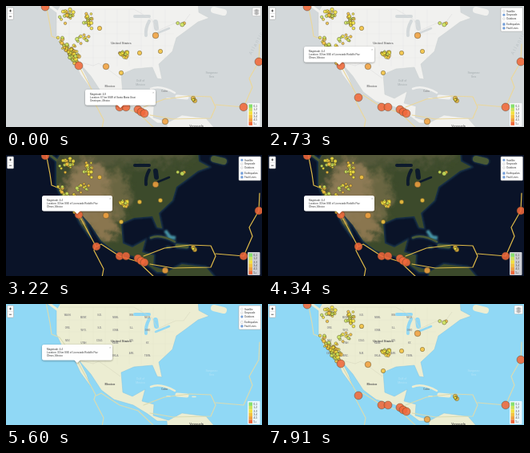
Animation, 320 px wide and 152 px high, one loop 8000 ms. Source, as an HTML page:

```html
<!DOCTYPE html>
<html lang="en">
<head>
<meta charset="utf-8">
<title>Earthquake map</title>
<style>
  html, body { margin: 0; width: 100%; height: 100%; overflow: hidden; }
  svg { display: block; width: 100vw; height: 100vh; }
  text { font-family: "Liberation Sans", Arial, sans-serif; font-size: 3px; fill: #333; }
  .mid { text-anchor: middle; }
  .round { stroke-linecap: round; stroke-linejoin: round; }
</style>
</head>
<body>
<svg id="stage" viewBox="0 0 320 152" preserveAspectRatio="none"></svg>
<script>
const LOOP = 8000;
const COLORS = ['#86e070', '#cbe45c', '#f4e23f', '#f4c23f', '#f0a03f', '#f0683a'];

// Map outlines as a few key points; islands and lakes are thick round strokes
const land = `M70-5 63 8 63 38 69 51 85 69 93 86 106 104 101 89 92 72 106 88 119 108 135 120 159 127 177 138
  189 147 201 147 203 175 275 170 250 141 220 137 203 146 184 140 185 126 170 122 174 107 158 116 146 111
  144 86 160 79 183 77 189 91 195 92 191 73 208 57 213 40 224 32 240 20 254 15 241 8 240-5Z`;
const islands = [
  ['M181 104Q193 99 211 109', 2.5], ['M214 114 226 115', 5], ['M201 116h4M233 116.5h4', 1.5],
  ['M52-2 64 7', 3], ['M260 5 272 8', 8]
];
const lakes = [['M161 13 179 13', 4], ['M175 37Q174 28 179 19', 4], ['M187 20 188 28', 6], ['M187 35 204 28', 2.5]];
const borders = 'M67 4H160L182 17 190 31 212 21H222L230 10M85 69 109 75 116 72 128 80 143 91';
const faults = `M50-2 55 24 57 38 67 42 91 75 112 114 110 120 122 143 120 154M113 115 119 112 142 127 165 134 186 154
  M172 127 198 117 230 113 256 114 262 127 256 141 209 142 180 137M262 124 297 127 308 102 304 91 316 70 317 48`;

let seed = 11;
const rand = () => (seed = seed * 16807 % 2147483647) / 2147483647;
const spread = w => (rand() + rand() - 1) * w;

// Markup helpers
const rect = (x, y, w, h, fill, extra = '') => `<rect x="${x}" y="${y}" width="${w}" height="${h}" fill="${fill}" ${extra}/>`;
const path = (d, fill, stroke = 'none', width = .4, extra = '') =>
  `<path d="${d}" fill="${fill}" stroke="${stroke}" stroke-width="${width}" ${extra}/>`;
const text = (x, y, s, style = '', cls = '') => `<text x="${x}" y="${y}" class="${cls}" style="${style}">${s}</text>`;
const label = (x, y, s, size, fill, weight = 400) =>
  text(x, y, s, `font-size:${size}px;fill:${fill};font-weight:${weight}`, 'mid');
const group = (id, content) => `<g id="${id}">${content}</g>`;
const strokes = (list, color, extra = 0) => list.map(([d, w]) => path(d, 'none', color, w + extra, 'class="round"')).join('');
const blob = ([x, y, rx, ry, fill]) => `<ellipse cx="${x}" cy="${y}" rx="${rx}" ry="${ry}" fill="${fill}"/>`;
const disc = (x, y, r, level) =>
  `<circle cx="${x}" cy="${y}" r="${r}" fill="${COLORS[level]}" fill-opacity=".88" stroke="#443c20" stroke-width=".4"/>`;

// Earthquakes: single strong ones, then seeded swarms
const discs = (points, r, level) => points.map(([x, y]) => disc(x, y, r, level)).join('');
const smallDisc = (x, y) => disc(x, y, 1.2 + rand() * 1.4, 1 + Math.floor(rand() * 3));
const repeat = (n, make) => Array.from({ length: n }, (_, i) => make(i)).join('');
const swarm = (x, y, w, h, n) => repeat(n, () => smallDisc(x + spread(w), y + spread(h)));
const californiaSwarm = repeat(80, () => {
  const k = Math.sqrt(rand());
  return smallDisc(66 + 23 * k + spread(5), 40 + 28 * k + spread(6));
});
const quakes =
  discs([[49, 1], [113, 115], [142, 127], [150, 127], [165, 130], [169, 133], [173, 135], [297, 127], [316, 70]], 5, 5) +
  discs([[187, 37], [199, 145], [125, 76]], 3.8, 4) +
  discs([[144, 84], [193, 57], [117, 28], [167, 59], [234, 116], [236, 119]], 2.7, 3) +
  swarm(102, 18, 8, 13, 18) + swarm(77, 13, 11, 13, 20) + swarm(147, 60, 8, 5, 18) + swarm(95, 46, 12, 12, 14) +
  swarm(219, 22, 5, 2, 3) + swarm(235, 118, 2, 3, 4) + californiaSwarm + disc(91, 75, 5, 5);

const stateGrid = repeat(9, i => `M${79 + i * 15} 4V${i < 2 ? 58 : 76}`) + repeat(4, i => `M62 ${20 + i * 15}H210`);
const stateNames = fill => 'WASH. MONT. N.D. MINN. WIS. MICH. ORE. WYO. S.D. IOWA ILL. OHIO NEV. UTAH COLO. KANS. MO. KY. CALIF. ARIZ. N.M. OKLA. ARK. TENN.'
  .split(' ').map((name, i) => label(77 + i % 6 * 20, 15 + Math.floor(i / 6) * 16 + i % 2 * 3, name, 2.6, fill, 700)).join('');
const countries = fill => label(144, 48, 'United States', 4, fill, 700) + label(130, 102, 'Mexico', 3.8, fill, 700) +
  label(198, 108, 'Cuba', 3.2, fill) + label(238, 151.5, 'Venezuela', 3.6, fill, 700);
const seaNames = fill => label(168, 95, 'Gulf of', 3.6, fill) + label(168, 99.5, 'Mexico', 3.6, fill) +
  label(257, 85, 'Sargasso', 3.6, fill) + label(257, 90, 'Sea', 3.6, fill);

const drawnMap = (sea, ground, coast, line) => rect(0, 0, 320, 152, sea) + path(land, ground, coast, .5) +
  strokes(islands, ground) + strokes(lakes, sea) +
  path(stateGrid, 'none', line, .25, 'clip-path="url(#onLand)"') + path(borders, 'none', line, .6);

const terrain = [
  [140, -2, 95, 14, '#55583b'], [104, 48, 30, 40, '#8d7a55'], [140, 50, 14, 32, '#6b6642'],
  [122, 88, 18, 18, '#8a7650'], [70, 24, 9, 30, '#3d492f']
];
const satellite = rect(0, 0, 320, 152, '#0a1328') +
  `<g filter="url(#shelf)">${path(land, 'none', '#1d3850', 3) + strokes(islands, '#1d3850', 2)}
    ${path('M199 95 205 103 212 104', 'none', '#4796a8', 4)}</g>` +
  path(land, '#3c4a2b') + strokes(islands, '#4a5a35') +
  `<g clip-path="url(#onLand)"><g filter="url(#mottle)">${terrain.map(blob).join('')}</g></g>` + strokes(lakes, '#0d1a2c');

const popup = (id, x, y, lines) => group(id,
  `<g filter="url(#shadow)">` + rect(x, y, 88, 19.5, '#fff', 'rx="2.5"') +
  path(`M${x + 40} ${y + 19}h8l-4 4z`, '#fff') + '</g>' +
  lines.map((s, i) => text(x + 6, y + 7 + i * 4.2, s)).join('') +
  text(x + 84, y + 4.5, '×', 'font-size:4px;fill:#999'));

const option = (id, y, s, corner) => {
  const box = (fill, extra) => rect(293.5, y - 2.6, 2.8, 2.8, fill, `rx="${corner}" ${extra}`);
  return box('#fff', 'stroke="#aaa" stroke-width=".4"') + box('#6f9fe0', `id="${id}"`) + text(298, y, s);
};

const controls =
  rect(1.5, 2, 8, 15, '#fff', 'rx="1" stroke="#aaa" stroke-width=".6"') + path('M1.5 9.5h8', 'none', '#ccc') +
  path('M4 6h3M5.5 4.5v3M4 13.2h3', 'none', '#222', .7) +
  rect(302, 122, 15.5, 29, '#fff', 'rx="1" fill-opacity=".8"') +
  COLORS.map((c, i) => rect(303.5, 123.5 + i * 4.4, 4.5, 4.4, c) +
    text(309.5, 126.8 + i * 4.4, i < 5 ? `${i}-${i + 1}` : '5+')).join('') +
  group('icon', rect(308, 2, 10.5, 10.5, '#fff', 'rx="1.2" stroke="#bbb" stroke-width=".6"') +
    repeat(3, i => path(`M313.2 ${8 - i * 2.1}l4 1.7-4 1.7-4-1.7z`, '#aaa', '#fff', .3))) +
  group('panel', rect(291, 2, 27.5, 30, '#fff', 'rx="1.2" stroke="#aaa" stroke-width=".6"') +
    option('pickSatellite', 7.6, 'Satellite', 1.4) + option('pickGray', 12.4, 'Grayscale', 1.4) +
    option('pickOutdoors', 17.2, 'Outdoors', 1.4) + path('M292 20h25.5', 'none', '#ddd') +
    option('pickQuakes', 24.2, 'Earthquakes', .5) + option('pickFaults', 29, 'Fault Lines', .5));

document.getElementById('stage').innerHTML = `<defs>
  <clipPath id="onLand"><path d="${land}"/></clipPath>
  <filter id="shelf"><feGaussianBlur stdDeviation="1.3"/></filter>
  <filter id="mottle"><feGaussianBlur stdDeviation="4" result="soft"/>
    <feTurbulence type="fractalNoise" baseFrequency=".08" numOctaves="3"/>
    <feDisplacementMap in="soft" scale="24" xChannelSelector="R" yChannelSelector="G"/></filter>
  <filter id="shadow" x="-10%" y="-20%" width="120%" height="150%">
    <feDropShadow dx="0" dy=".8" stdDeviation="1.2" flood-opacity=".4"/></filter></defs>` +
  rect(0, 0, 320, 152, '#ddd') +
  group('mapGray', drawnMap('#d3d8da', '#f1f1ef', '#c9cecf', '#dddedd') + countries('#777') + seaNames('#a3abae') +
    `<g transform="rotate(-62 314 48)">${label(314, 48, 'A t l a n t i c', 6, '#bcc4c7')}</g>`) +
  group('mapSatellite', satellite) +
  group('mapOutdoors', drawnMap('#90d8f5', '#ecedd2', '#7fc4e4', '#d8d8c0') + countries('#555') + seaNames('#b4e3f6') +
    stateNames('#888')) +
  path(faults, 'none', '#ead79c', 1.2, 'id="faults" class="round"') +
  group('quakes', quakes) +
  popup('firstPopup', 99, 105, ['Magnitude: 4.8', 'Location: 67 km SSW of Santa Maria Utuxi', 'Ometepec, Mexico']) +
  popup('secondPopup', 45, 51, ['Magnitude: 4.4', 'Location: 30 km SSE of Licenciado Rodolfo Paz', 'Olmos, Mexico']) +
  controls;

const el = id => document.getElementById(id);
const fade = (t, start) => Math.min(1, Math.max(0, (t - start) / 200));
const opacity = (id, value) => el(id).setAttribute('opacity', +value);

// Each base map starts at its time and is removed when the next one starts
const bases = [
  { name: 'Gray', start: -200, line: '#ead79c' },
  { name: 'Satellite', start: 2930, line: '#e0bb48' },
  { name: 'Outdoors', start: 4460, line: '#d9dbb2' }
];

function draw(now) {
  const t = now % LOOP;
  const quakesOff = 5600;
  const base = bases.findLast(b => t >= b.start);
  const showQuakes = t < quakesOff || t >= 6090;
  const showFaults = t < 6440 || t >= 7070;
  const open = t >= 1500 && t < 7840;

  for (const b of bases) {
    opacity('map' + b.name, b === base ? fade(t, b.start) : 0);
    opacity('pick' + b.name, b === base);
  }
  el('faults').setAttribute('stroke', base.line);
  opacity('faults', showFaults);
  opacity('pickFaults', showFaults);
  opacity('quakes', showQuakes);
  opacity('pickQuakes', showQuakes);
  opacity('firstPopup', 1 - fade(t, 70));
  opacity('secondPopup', fade(t, 70) * (1 - fade(t, quakesOff)));
  opacity('icon', !open);
  opacity('panel', open);
  requestAnimationFrame(draw);
}
draw(0);
</script>
</body>
</html>
```
